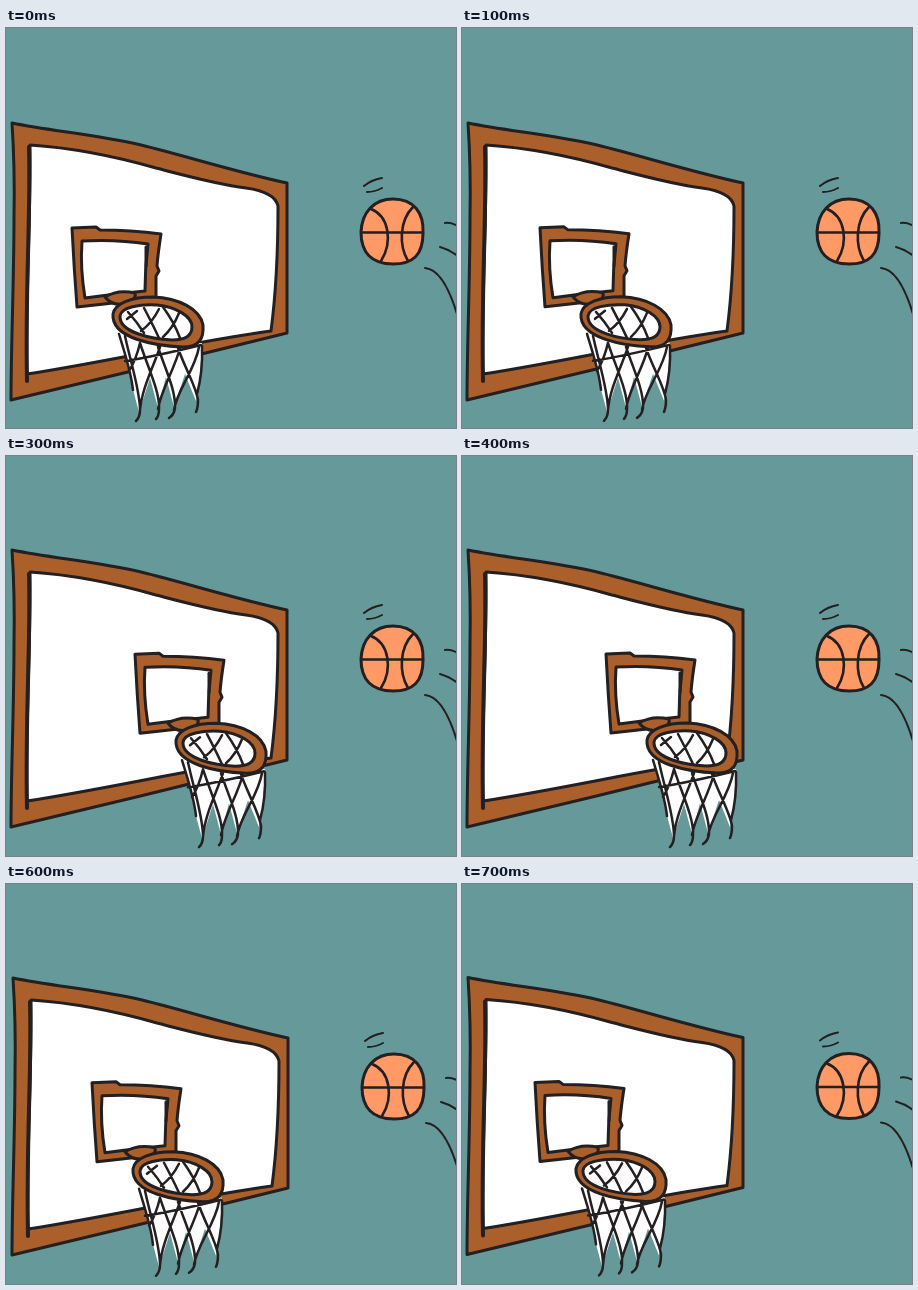
These frames come from a looping animation (450x400 px, 0.8 s). An HTML page:

```html
<!DOCTYPE html>
<html lang="en">
<head>
<meta charset="utf-8">
<title>Moving hoop</title>
<style>
  html, body { margin: 0; width: 100%; height: 100%; overflow: hidden; background: #669999; }
  svg { display: block; width: 100%; height: 100%; }
  path { stroke: #241f20; stroke-width: 3; stroke-linecap: round; stroke-linejoin: round; }
  .wood { fill: #ab602c; }
  .white { fill: #fff; }
  .line { fill: none; }
  .thin { fill: none; stroke-width: 2.5; }
  .bare { stroke: none; }
</style>
</head>
<body>
<svg viewBox="0 0 450 400">
  <g id="scene">
    <!-- backboard -->
    <path class="wood" d="M6 95 C45 103 93 107 135 117 C180 128 230 144 281 155 L281 305 C200 325 90 352 5 372 C5 320 8 250 8 190 Q9 140 6 95Z"/>
    <path class="white" d="M24 117 C70 120 115 130 150 140 C185 149 210 156 240 160 Q269 164 272 178 C272 225 270 265 265 303 C190 313 105 333 21 346 C19 280 25 190 24 117Z"/>
    <path class="line" style="stroke-width:4" d="M23 119 C25 185 19 260 21 353"/>

    <g id="hoop">
      <!-- target square -->
      <path class="wood" d="M66 200 L90 199 L94 202 Q125 202 155 206 Q152 225 151 238 L153 243 L150 248 V270 Q108 275 71 279 Q68 240 66 200Z"/>
      <path class="white" d="M76 213 Q110 211 142 216 Q139 240 139 263 Q108 266 79 270 Q74 240 76 213Z"/>
      <path class="line" d="M140 219 V238"/>
      <!-- net -->
      <path class="white bare" d="M113 305 L121 336 L126 358 L133 384 L144 350 L152 380 L160 349 L168 379 L179 346 L190 373 L194 348 L196 315 L170 313Z"/>
      <path class="thin" d="M113 306 C119 326 125 343 127 362 M119 333 C145 329 171 323 195 317
        M119 308 C124 332 134 362 134 382 Q134 389 130 393
        M134 315 C142 340 154 364 153 381 Q153 388 150 391
        M152 319 C158 338 170 362 169 380 Q168 387 163 390
        M172 320 C178 338 190 358 192 372 Q192 380 190 384
        M134 315 Q130 332 123 343
        M154 319 C147 340 136 360 134 382
        M174 320 C169 340 155 362 152 381
        M193 319 C189 342 171 362 168 382
        M196 318 Q197 344 191 366"/>
      <!-- rim and bracket -->
      <path class="wood" d="M99 269 Q112 261 129 265 Q131 273 118 276 Q106 278 99 269Z"/>
      <path class="wood" d="M107 286 C109 275 126 269 147 269 C173 270 194 281 197 297 C198 311 193 319 177 319 C151 318 105 311 107 286Z"/>
      <path class="white" d="M114 288 C115 279 134 276 151 277 C170 279 186 288 186 299 C186 308 179 312 166 312 C147 311 113 305 114 288Z"/>
      <path class="thin" d="M121 291 L131 283 M122 284 Q131 294 138 305
        M138 280 Q145 293 153 310 M153 281 Q146 295 135 303
        M157 279 Q168 294 174 310 M173 285 Q167 300 157 309"/>
    </g>

    <!-- ball -->
    <path fill="#ff9966" d="M387 171 C408 171 418 185 417 205 C417 227 407 236 387 236 C365 236 355 224 355 204 C356 184 368 171 387 171Z"/>
    <path class="line" style="stroke-width:2.6" d="M356 204.5 H417 M365 181 C383 188 387 214 375 233 M407 179 C393 193 393 218 402 233"/>
    <path class="thin" style="stroke-width:2" d="M358 158 Q365 152 376 150 M361 164 Q369 164 376 160
      M439 195 Q445 194 454 199 M434 219 Q445 222 454 230 M419 240 C434 241 444 263 451 286"/>
  </g>
</svg>
<script>
  const STEP = 100;
  // each pose: picture shift x, y and hoop travel along the board
  const poses = [
    [0, 0, 0], [0, 0, 12], [-1, 0, 32], [0, -1, 63],
    [0, -1, 78], [-1, -1.5, 63], [1, -1, 19], [0, -1.5, 7]
  ];
  const scene = document.getElementById('scene');
  const hoop = document.getElementById('hoop');
  const move = (el, x, y) => el.setAttribute('transform', `translate(${x} ${y})`);

  function draw(now) {
    const [x, y, travel] = poses[Math.floor(now / STEP) % poses.length];
    move(scene, x, y);
    move(hoop, travel, -travel / 80);
    requestAnimationFrame(draw);
  }
  requestAnimationFrame(draw);
</script>
</body>
</html>
```
